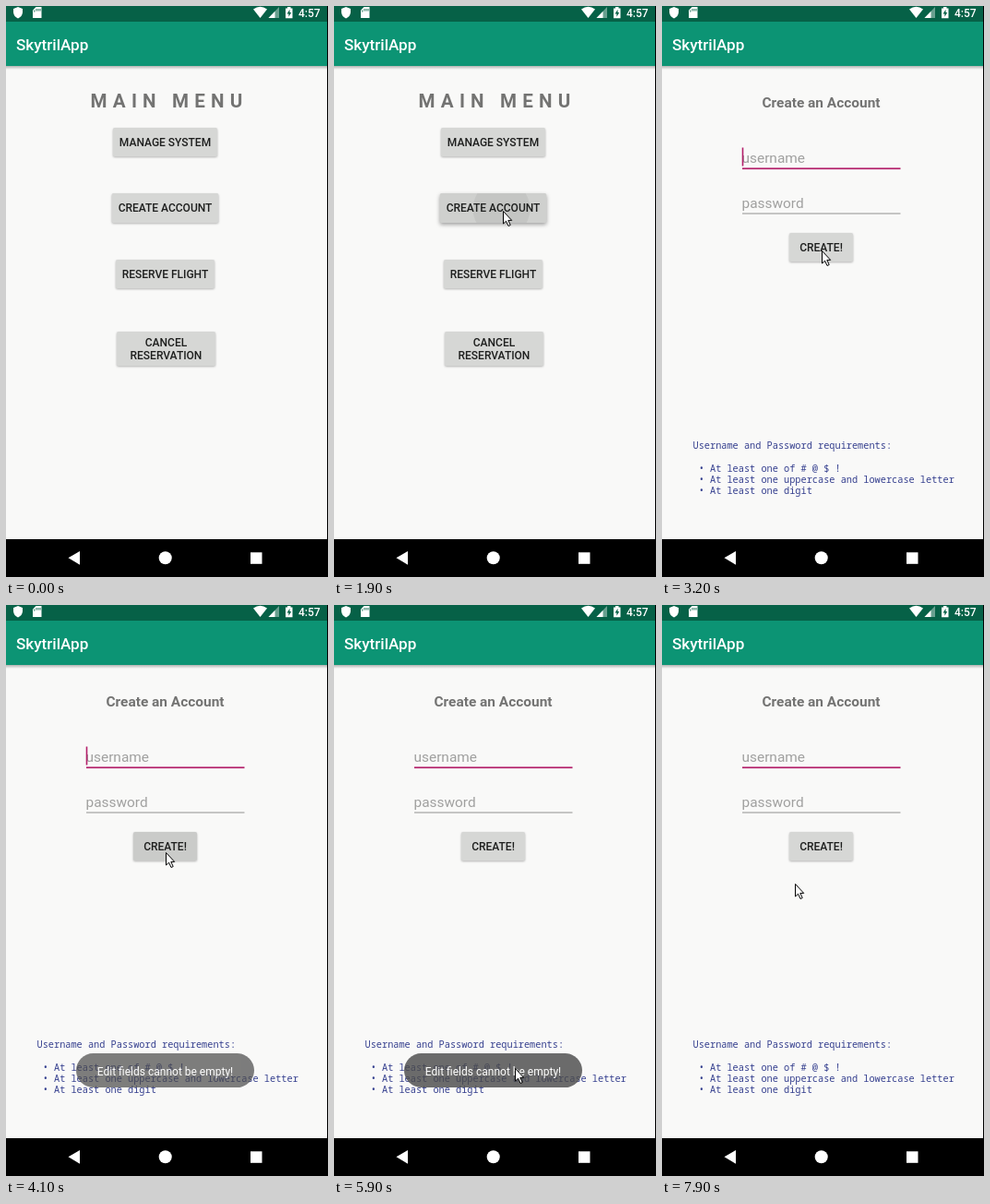
An HTML page for the animation above (8 s loop, 349 by 619 pixels).

```html
<!DOCTYPE html>
<html lang="en">
<head>
<meta charset="utf-8">
<title>Account creation demo</title>
<style>
  html, body { margin: 0; width: 100%; height: 100%; overflow: hidden; background: #000; }
  svg { display: block; width: 100vw; height: 100vh; }
  text { font-family: Roboto, sans-serif; white-space: pre; }
  .title { font-size: 17.14px; font-weight: 500; fill: #fff; }
  .button text { font-size: 12px; font-weight: 500; fill: #1e1f1e; text-anchor: middle; }
  .face { fill: #d6d7d5; filter: drop-shadow(0 1px 1px rgba(0, 0, 0, .28)); }
  .face.raised { fill: #cfd0ce; filter: drop-shadow(0 2px 2px rgba(0, 0, 0, .36)); }
  .heading { font-weight: 700; fill: #737372; }
  .hint { font-size: 15.43px; fill: #a0a09f; }
  .rules text { font: 10.28px "Noto Sans Mono", monospace; fill: #36408f; }
</style>
</head>
<body>
<svg viewBox="0 0 349 619" preserveAspectRatio="none">
  <defs>
    <linearGradient id="shade" x2="0" y2="1">
      <stop stop-color="#000" stop-opacity=".28"/>
      <stop offset="1" stop-color="#000" stop-opacity="0"/>
    </linearGradient>
    <g id="window">
      <rect width="349" height="619" fill="#f9f9f8"/>
      <rect y="65" width="349" height="4" fill="url(#shade)"/>
      <rect width="349" height="65" fill="#0c9474"/>
      <rect width="349" height="17" fill="#066147"/>
      <text class="title" x="11" y="48">SkytrilApp</text>
    </g>
  </defs>

  <g id="menu">
    <use href="#window"/>
    <text class="heading" x="91.5" y="109.5" font-size="20.57" letter-spacing="6.17">MAIN MENU</text>
  </g>

  <g id="form">
    <use href="#window"/>
    <text class="heading" x="172.5" y="110" font-size="15.43" text-anchor="middle">Create an Account</text>
    <text class="hint" x="86.5" y="169.5">username</text>
    <rect x="87" y="175.4" width="171.5" height="1.7" fill="#b3206a"/>
    <text class="hint" x="86.5" y="218.7">password</text>
    <rect x="87" y="224.5" width="171.5" height="1" fill="#929291"/>
    <rect id="caret" x="86.7" y="153.5" width="1.6" height="20" fill="#b3206a"/>
    <g class="rules">
      <text x="33.5" y="480">Username and Password requirements:</text>
      <text x="33.5" y="504.7"> • At least one of # @ $ !</text>
      <text x="33.5" y="517"> • At least one uppercase and lowercase letter</text>
      <text x="33.5" y="529.3"> • At least one digit</text>
    </g>
  </g>

  <g id="toast">
    <rect x="76" y="486" width="193" height="37" rx="18.5" fill="#4b4b4b" fill-opacity=".82"/>
    <text x="172.5" y="510" font-size="12" fill="#fff" text-anchor="middle">Edit fields cannot be empty!</text>
  </g>

  <g fill="#fff">
    <path d="M13 1L18 3V7Q17.500 11.500 13 13.500Q8.500 11.500 8 7V3Z"/>
    <path d="M32.500 1H38.500V13H29V4.500Z"/>
    <path d="M30.800 4.500v2M33 3v2.500M35 3v2.500M37 3v2.500" stroke="#066147" stroke-width=".9"/>
    <path d="M268 3.500Q275.500 -2 283 3.500L275.500 13Z"/>
    <path d="M296 1V13H284.500Z" opacity=".4"/>
    <path d="M291.500 5.700V13H284.500Z"/>
    <path d="M303 2.500H305V1H308.500V2.500H310.500V13.300H303Z"/>
    <path d="M307.500 3.800L304.600 8.600H306.400V11.800L309.200 7H307.500Z" fill="#066147"/>
    <text x="317" y="11.700" font-size="12" font-weight="500">4:57</text>
  </g>

  <rect y="578" width="349" height="41"/>
  <rect x="348" width="1" height="619"/>
  <g fill="#fff">
    <path d="M67.500 598.300L80 591V605.700Z"/>
    <circle cx="172.700" cy="598.300" r="7"/>
    <rect x="265" y="592.300" width="12.500" height="12.500"/>
  </g>

  <path id="cursor" d="M.5 .5V14L3.600 11.200L6 16.500L8.200 15.500L5.800 10.400H9.700Z" fill="#fff" stroke="#000" stroke-linejoin="round"/>
</svg>

<script>
const LOOP = 8000;
const byId = id => document.getElementById(id);
const progress = (t, start, end) => Math.min(1, Math.max(0, (t - start) / (end - start)));

function addButton(parent, x, y, width, height, lines, textY) {
  const group = document.createElementNS("http://www.w3.org/2000/svg", "g");
  const clipId = `clip${x}`;
  const box = `x="${x}" y="${y}" width="${width}" height="${height}" rx="1.7"`;
  group.setAttribute("class", "button");
  group.innerHTML = `<clipPath id="${clipId}"><rect ${box}/></clipPath>
    <rect class="face" ${box}/>
    <circle class="ripple" cx="${x + width / 2 + 9}" cy="${y + height / 2 + 1}" r="0"
      fill-opacity=".055" clip-path="url(#${clipId})"/>` +
    lines.map((line, i) => `<text x="${x + width / 2}" y="${textY + i * 14}">${line}</text>`).join("");
  parent.insertBefore(group, parent.querySelector("#caret"));
  return { face: group.querySelector(".face"), ripple: group.querySelector(".ripple") };
}

const menu = byId("menu"), form = byId("form");
addButton(menu, 116, 132, 113, 31, ["MANAGE SYSTEM"], 152);
const account = addButton(menu, 114.7, 203, 115.6, 32, ["CREATE ACCOUNT"], 223.2);
addButton(menu, 119, 275, 107, 31, ["RESERVE FLIGHT"], 295);
addButton(menu, 120, 353, 107, 37, ["CANCEL", "RESERVATION"], 369);
const create = addButton(form, 138, 246, 69, 31, ["CREATE!"], 265.7);

// time, x, y of the pointer tip
const pointerPath = [
  [500, 10, 295], [700, 57, 252], [800, 57, 252], [1300, 182, 205],
  [1400, 182, 205], [1600, 183, 222], [2800, 183, 222], [3200, 173, 265],
  [3300, 173, 265], [3400, 173, 268], [4100, 173, 268], [4400, 155, 350],
  [5000, 122, 505], [5300, 122, 505], [5400, 122, 507], [5500, 122, 507],
  [5900, 196, 502], [6300, 231, 507], [7500, 231, 507], [7900, 144, 302], [LOOP, 144, 302]
];

function pointerAt(t) {
  const i = Math.max(1, pointerPath.findIndex(key => key[0] > t));
  const [t0, x0, y0] = pointerPath[i - 1], [t1, x1, y1] = pointerPath[i];
  const p = progress(t, t0, t1);
  return [Math.round(x0 + (x1 - x0) * p), Math.round(y0 + (y1 - y0) * p)];
}

function draw(t) {
  const cursor = byId("cursor");
  cursor.setAttribute("visibility", t >= 500 ? "visible" : "hidden");
  cursor.setAttribute("transform", `translate(${pointerAt(t)})`);

  account.face.classList.toggle("raised", t >= 1600);
  account.ripple.setAttribute("r", 31 * progress(t, 1550, 1900));
  create.ripple.setAttribute("r", 48 * progress(t, 3550, 4000));
  create.ripple.setAttribute("opacity", 1 - progress(t, 4100, 4400));

  const open = progress(t, 2040, 2300);
  form.setAttribute("opacity", Math.min(1, open * 1.3));
  form.setAttribute("transform", `translate(0 ${46 * (1 - open) ** 3})`);

  const caretOn = t >= 3000 && Math.floor((t - 5110) / 525) % 2 === 0;
  byId("caret").setAttribute("visibility", caretOn ? "visible" : "hidden");

  const fadeIn = 1 - (1 - progress(t, 3900, 4400)) ** 4;
  const fadeOut = 1 - progress(t, 5800, 6300) ** 3;
  byId("toast").setAttribute("opacity", fadeIn * fadeOut);
}

function tick() {
  draw(performance.now() % LOOP);
  requestAnimationFrame(tick);
}
tick();
</script>
</body>
</html>
```
